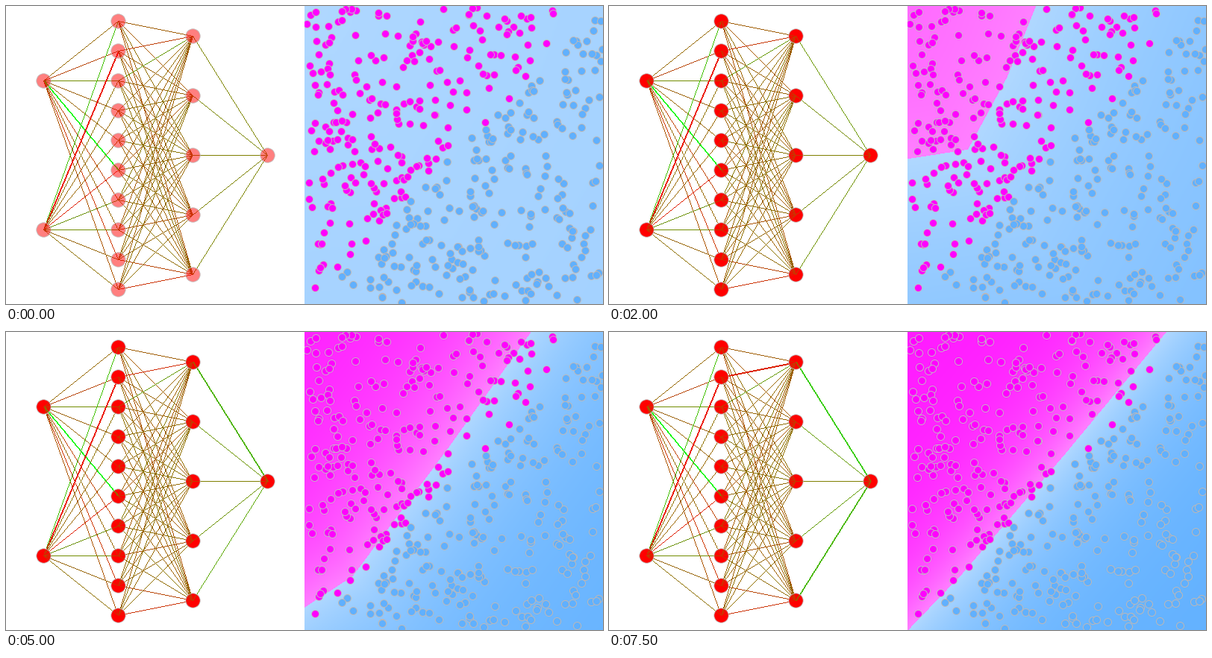
Write a matplotlib script that moves like this. It is 800 px wide and 400 px high and loops after 8000 ms.

```python
import numpy as np
import matplotlib.pyplot as plt
from matplotlib.animation import FuncAnimation
from matplotlib.patches import Circle

DPI = 100
PX = 72 / DPI
SIZE = 400
FRAMES, STEP = 16, 500

PINK = np.array([255, 0, 255])
BLUE = np.array([96, 176, 255])

rng = np.random.default_rng(11)
fig = plt.figure(figsize=(8, 4), dpi=DPI, facecolor="white")


def panel(left):
    ax = fig.add_axes([left, 0, 0.5, 1])
    ax.axis("off")
    return ax


def show(ax, pixels, zorder):
    return ax.imshow(pixels, extent=(0, SIZE, SIZE, 0), aspect="auto",
                     interpolation="nearest", zorder=zorder)


net, field = panel(0), panel(0.5)

# ---------- network ----------
LAYERS = [
    [(50, 100), (50, 300)],
    [(150, y) for y in range(20, 400, 40)],
    [(250, y) for y in range(40, 400, 80)],
    [(350, 200)],
]
THICK_ABOVE = [0.8, 0.7, 0.37]

# (layer, from, to): the weights that stand out from the random ones
STRONG = {
    (0, 0, 1): -0.45, (0, 0, 2): 0.1, (0, 0, 5): 0.95, (0, 0, 6): -0.5,
    (0, 0, 8): -0.6, (0, 1, 0): 0.5, (0, 1, 1): -0.85, (0, 1, 5): -0.75,
    (0, 1, 6): 0.15, (0, 1, 7): 0.1, (1, 1, 0): -0.5, (1, 2, 0): 0.2,
    (1, 8, 4): -0.45, (1, 9, 4): -0.6,
}
# Weights that training moves, as (start, end)
TRAINED = {
    (1, 1, 0): (-0.5, -0.73), (2, 0, 0): (0.03, 0.6), (2, 1, 0): (0.05, 0.22),
    (2, 2, 0): (0, 0), (2, 3, 0): (0.02, 0.23), (2, 4, 0): (0.03, 0.44),
}


def make_edges():
    edges = []
    for n, (left, right) in enumerate(zip(LAYERS, LAYERS[1:])):
        for i, a in enumerate(left):
            for j, b in enumerate(right):
                w = STRONG.get((n, i, j), rng.normal(-0.18, 0.09))
                edges.append((n, a, b, *TRAINED.get((n, i, j), (w, w))))
    return edges


EDGES = make_edges()


def draw_line(pixels, a, b, color, thick):
    """One-pixel stepped line; a thick one gets a second row."""
    (x0, y0), (x1, y1) = a, b
    n = max(abs(x1 - x0), abs(y1 - y0)) + 1
    xs = np.linspace(x0, x1, n).round().astype(int)
    ys = np.linspace(y0, y1, n).round().astype(int)
    pixels[ys, xs] = color
    if thick:
        if abs(x1 - x0) > abs(y1 - y0):
            ys = ys + 1
        else:
            xs = xs + 1
        pixels[ys, xs] = color


def net_image(t):
    pixels = np.zeros((SIZE, SIZE, 4), np.uint8)
    for n, a, b, start, end in EDGES:
        w = start + (end - start) * t / 7.5
        color = (127.5 * (1 - w), 127.5 * (1 + w), 0, 255)
        draw_line(pixels, a, b, np.array(color).astype(np.uint8),
                  abs(w) > THICK_ABOVE[n])
    return pixels


cores = []
for x, y in sum(LAYERS, []):
    center = (x + 0.5, y + 0.5)
    cores.append(net.add_patch(Circle(center, 9.5, fc="red", ec="none", zorder=1)))
    net.add_patch(Circle(center, 9.7, fc=(1, 0, 0, 0.5), ec="#c0c0c0",
                         lw=0.8 * PX, zorder=3))

# ---------- sample points ----------
dots = rng.uniform(1, SIZE - 1, (470, 2))
above = dots.sum(axis=1) < SIZE
for mask, color, rim in [(above, PINK, "#c0c0c0"), (~above, BLUE, "#c4b8b0")]:
    field.scatter(*dots[mask].T, s=(10 * PX) ** 2, color=[color / 255],
                  edgecolors=rim, linewidths=0.9 * PX, zorder=2)

# ---------- decision field ----------
X, Y = np.meshgrid(np.arange(SIZE) + 0.5, np.arange(SIZE) + 0.5)


def approach(t, limit, tau, power):
    return limit * (1 - np.exp(-(t / tau) ** power))


def smoothstep(s):
    s = np.clip(s, 0, 1)
    return s * s * (3 - 2 * s)


def border_distance(t):
    """Signed distance to a border of three straight pieces, t in seconds."""
    w = approach(t, 365, 2.94, 1.17) + 0.3
    h = approach(t, 408, 2.62, 1.33) + 0.3
    late = max(t - 1.5, 0)
    bend = np.exp(-late / 1.6)
    path = [
        (w, 0),
        ((0.6 + 0.24 * bend) * w, (0.41 + 0.075 * bend) * h),
        ((0.2 + 0.37 * bend) * w, (0.95 - 0.023 * late) * h),
        (0, h),
    ]
    planes = []
    for (x0, y0), (x1, y1) in zip(path, path[1:]):
        dx, dy = x1 - x0, y1 - y0
        planes.append(((X - x0) * dy - (Y - y0) * dx) / np.hypot(dx, dy))
    return np.max(planes, axis=0)


def tint(color, depth, gain, length):
    alpha = 0.5 + gain * (1 - np.exp(-depth / length))
    return 255 + alpha[..., None] * (color - 255)


def field_image(t):
    d = border_distance(t)
    depth = np.abs(d)
    pink = tint(PINK, depth, 0.4 * smoothstep((t - 0.8) / 3),
                260 * np.exp(-t / 5.6))
    blue = tint(BLUE, depth, 0.5 - 0.38 * np.exp(-t / 1.9),
                70 + 530 * np.exp(-t / 2))
    return np.where(d[..., None] < 0, pink, blue).round().astype(np.uint8)


lines = show(net, net_image(0), 2)
ground = show(field, field_image(0), 0)
for ax in (net, field):
    ax.set_xlim(0, SIZE)
    ax.set_ylim(SIZE, 0)


def update(k):
    t = k * STEP / 1000
    lines.set_data(net_image(t))
    ground.set_data(field_image(t))
    for core in cores:
        core.set_visible(k > 0)
    return []


anim = FuncAnimation(fig, update, frames=FRAMES, interval=STEP,
                     repeat=True, repeat_delay=0, blit=False)
plt.show()
```
